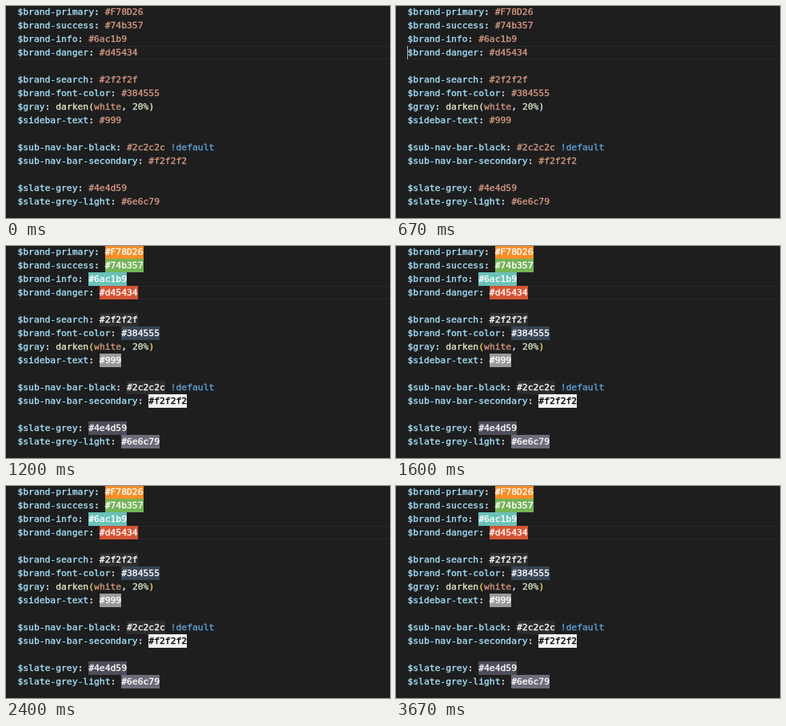
These frames come from a looping animation (480 px wide and 266 px high, 3740 ms). An HTML page:

```html
<!DOCTYPE html>
<html lang="en">
<head>
<meta charset="utf-8">
<title>Colour variables</title>
<style>
  html, body { margin: 0; width: 100%; height: 100%; overflow: hidden; background: #1e1e1f; }
  .editor { position: relative; width: 480px; height: 266px; overflow: hidden; }
  pre {
    position: absolute; left: 14.4px; top: -1px; margin: 0;
    font: 11.35px/17px "DejaVu Sans Mono", "Liberation Mono", monospace;
    -webkit-text-stroke: .35px;
    color: #dceef2;
  }
  .line {
    position: absolute; left: 14px; right: 0; top: 50px; height: 17px; box-sizing: border-box;
    border: solid #29292a; border-width: 1px 0;
  }
  .caret {
    position: absolute; left: 13.5px; top: 50px; width: 1.5px; height: 17px; background: #b4b4b2;
    animation: caret 3740ms step-end infinite;
  }
  .var { color: #a6e2fa; }
  .fn { color: #e6e8c4; }
  .num { color: #cfe3c3; }
  .flag { color: #5fa3d6; }
  .str { color: #d0937c; }
  .paren { animation: bracket 3740ms step-end infinite; }
  .hex {
    display: inline-block; height: 17px; vertical-align: top;
    animation: mark 3740ms step-end infinite;
  }
  /* caret shows 600–1130 ms, colour marks from 1200 ms */
  @keyframes caret {
    0% { opacity: 0; }
    16.04% { opacity: 1; }
    30.21%, 100% { opacity: 0; }
  }
  @keyframes mark {
    0% { background: transparent; color: #d69a83; }
    32.08%, 100% { background: var(--c); color: var(--ink, #fff); }
  }
  @keyframes bracket {
    0% { color: #e6e8dc; }
    32.08%, 100% { color: #e6d45c; }
  }
</style>
</head>
<body>
<div class="editor">
  <div class="line"></div>
  <pre id="code"></pre>
  <div class="caret"></div>
</div>
<script>
  const source = `$brand-primary: #F78D26
$brand-success: #74b357
$brand-info: #6ac1b9
$brand-danger: #d45434

$brand-search: #2f2f2f
$brand-font-color: #384555
$gray: darken(white, 20%)
$sidebar-text: #999

$sub-nav-bar-black: #2c2c2c !default
$sub-nav-bar-secondary: #f2f2f2

$slate-grey: #4e4d59
$slate-grey-light: #6e6c79`;

  const rules = [
    ['var', /^\$/],
    ['hex', /^#/],
    ['flag', /^!/],
    ['fn', /^darken/],
    ['str', /^white/],
    ['num', /^\d+%/],
    ['paren', /^[()]/],
  ];

  const code = document.getElementById('code');
  for (const token of source.match(/\$[\w-]+|#\w+|!\w+|\d+%|\w+|[()]|[^\w$#!()]+/g)) {
    const rule = rules.find(([, pattern]) => pattern.test(token));
    const span = document.createElement('span');
    span.textContent = token;
    if (rule) span.className = rule[0];
    if (span.className === 'hex') {
      span.style.setProperty('--c', token);
      if (token === '#f2f2f2') span.style.setProperty('--ink', '#000');
    }
    code.append(span);
  }
</script>
</body>
</html>
```
